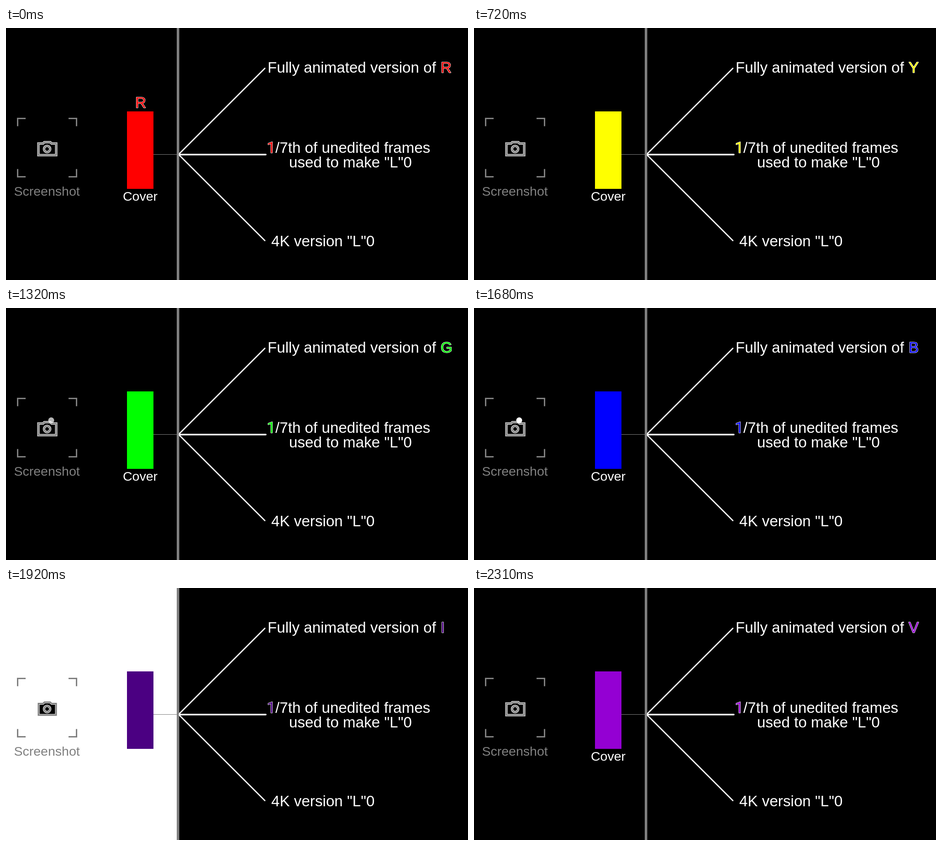
Recreate the animation shown at these times as an HTML page with a canvas. Size 1012 px wide and 553 px high, loop 2.7 s.

```html
<!DOCTYPE html>
<html lang="en">
<head>
<meta charset="utf-8">
<title>Colour cover diagram</title>
<style>
  html, body { margin: 0; width: 100%; height: 100%; overflow: hidden; background: #000; }
  canvas { display: block; }
</style>
</head>
<body>
<canvas id="stage" width="1012" height="553"></canvas>
<script>
const ctx = document.getElementById('stage').getContext('2d');
const LOOP = 2700;
const GRAY = '#808080';
const BIG = 33.2, SMALL = 28.5;
const SANS = '"Liberation Sans", Arial, sans-serif';
const PLAIN_ONE = 'Roboto, sans-serif'; // its "1" has no foot

const hues = [
  { at: 0, letter: 'R', color: '#ff0000' },
  { at: 360, letter: 'O', color: '#ff8000' },
  { at: 720, letter: 'Y', color: '#ffff00' },
  { at: 1110, letter: 'G', color: '#00ff00' },
  { at: 1500, letter: 'B', color: '#0000ff' },
  { at: 1890, letter: 'I', color: '#4b0082' },
  { at: 2310, letter: 'V', color: '#9400d3' }
];
const dotSteps = [960, 1080, 1200, 1320, 1470, 1680];
const flash = { start: 1920, end: 1950 };

function text(str, x, y, size, color = '#fff') {
  ctx.font = `${size}px ${SANS}`;
  ctx.fillStyle = color;
  ctx.fillText(str, x, y);
}

function outlined(str, x, y, color, family = SANS) {
  ctx.font = `${BIG}px ${family}`;
  ctx.lineJoin = 'round';
  ctx.lineWidth = 1.6;
  ctx.strokeStyle = '#fff';
  ctx.strokeText(str, x, y);
  ctx.fillStyle = color;
  ctx.fillText(str, x, y);
}

function polyline(points, width, color) {
  ctx.beginPath();
  points.forEach(([x, y]) => ctx.lineTo(x, y));
  ctx.lineWidth = width;
  ctx.strokeStyle = color;
  ctx.stroke();
}

function rect(x, y, w, h, color) {
  ctx.fillStyle = color;
  ctx.fillRect(x, y, w, h);
}

function drawViewfinder() {
  ctx.lineJoin = 'miter';
  ctx.lineCap = 'butt';
  for (const [x, dx] of [[25.5, 1], [154.5, -1]])
    for (const [y, dy] of [[198.5, 1], [326.5, -1]])
      polyline([[x + 17.5 * dx, y], [x, y], [x, y + 17 * dy]], 3, GRAY);
  text('Screenshot', 17.5, 367.5, SMALL, GRAY);
}

function drawCamera() {
  const body = new Path2D('M71 253.5H81L84 250.5H97L100 253.5H110V279H71Z');
  const lens = new Path2D();
  lens.arc(90, 265.5, 6.8, 0, 2 * Math.PI);
  ctx.lineJoin = 'miter';
  ctx.fillStyle = '#000';
  for (const shape of [body, lens]) {
    ctx.fill(shape);
    for (const [width, color] of [[5, '#fff'], [3, GRAY]]) {
      ctx.lineWidth = width;
      ctx.strokeStyle = color;
      ctx.stroke(shape);
    }
  }
}

function drawBranches() {
  ctx.lineCap = 'round';
  polyline([[380, 275.5], [567, 88.5]], 2.7, '#fff');
  polyline([[380, 277.75], [569, 277.75]], 3.5, '#fff');
  polyline([[380, 279.5], [567, 466.5]], 2.7, '#fff');
}

function draw(t) {
  const hue = hues.findLast(h => t >= h.at);
  const flashing = t >= flash.start && t < flash.end;
  const dotLevel = dotSteps.filter(at => t >= at).length;

  rect(0, 0, 1012, 553, '#000');
  if (flashing) rect(0, 0, 375, 553, '#fff');

  drawViewfinder();
  drawCamera();
  if (dotLevel && t < flash.start) {
    ctx.beginPath();
    ctx.arc(99, 246.5, 6.5, 0, 2 * Math.PI);
    ctx.fillStyle = `rgba(255, 255, 255, ${(dotLevel + 1) / 7})`;
    ctx.fill();
  }

  rect(323, 277, 51, 1, GRAY);
  rect(265, 183, 58, 170, hue.color);
  text('Cover', 256, 379, SMALL);
  if (t < 30) outlined('R', 283, 175, hue.color);

  rect(374, 0, 5.5, 553, GRAY);
  drawBranches();

  text('Fully animated version of', 573, 98, BIG);
  outlined(hue.letter, 952, 98, hue.color);
  text('/7th of unedited frames', 590, 273.5, BIG);
  outlined('1', 571.5, 273.5, hue.color, PLAIN_ONE);
  text('used to make "L"0', 620, 306, BIG);
  text('4K version "L"0', 581, 478.5, BIG);
}

const start = performance.now();
function tick() {
  draw((performance.now() - start) % LOOP);
  requestAnimationFrame(tick);
}
tick();
</script>
</body>
</html>
```
